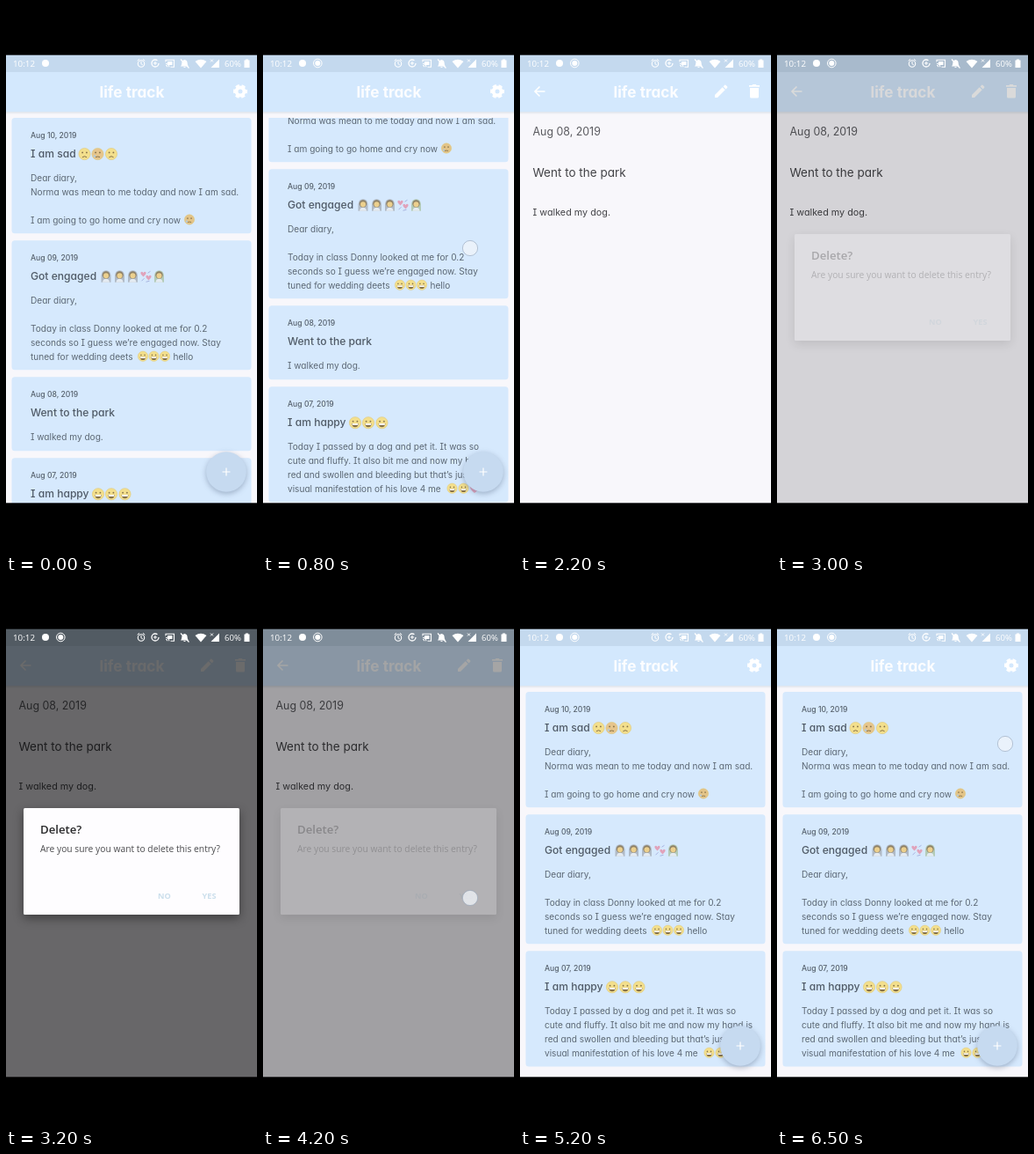
Write an HTML page that moves like this. It is 286 px wide and 620 px high and loops after 6600 ms.

```html
<!DOCTYPE html>
<html lang="en">
<head>
<meta charset="utf-8">
<title>Diary app</title>
<style>
  html, body { margin: 0; width: 100%; height: 100%; overflow: hidden; background: #000; }
  svg { display: block; }
  text { font-family: Inter, sans-serif; font-feature-settings: "cv11", "cv08"; white-space: pre; }
  .system text { font-family: "Open Sans", sans-serif; }
  .fab { filter: drop-shadow(0 2.5px 3px rgba(60, 80, 110, .38)); }
  .panel { filter: drop-shadow(0 4px 6px rgba(0, 0, 0, .4)); }
</style>
</head>
<body>
<svg id="stage" width="286" height="620" viewBox="0 0 286 620"></svg>
<script>
const LOOP = 6600, STEP = 100;
const TOP = 55, HEIGHT = 510, SCROLL = 81;

// ---------- drawing helpers ----------
const text = (x, y, size, str, fill, weight = 400, anchor = 'start') =>
  `<text x="${x}" y="${y}" font-size="${size}" fill="${fill}" font-weight="${weight}" text-anchor="${anchor}">${str}</text>`;
const rect = (x, y, w, h, fill, extra = '') =>
  `<rect x="${x}" y="${y}" width="${w}" height="${h}" fill="${fill}" ${extra}/>`;
const circle = (x, y, r, fill, extra = '') =>
  `<circle cx="${x}" cy="${y}" r="${r}" fill="${fill}" ${extra}/>`;
const line = (d, width = 1, color = '#fff') =>
  `<path d="${d}" fill="none" stroke="${color}" stroke-width="${width}"/>`;
const shape = (d, fill = '#fff') => `<path d="${d}" fill="${fill}"/>`;
const at = (x, y, scale, body) => `<g transform="translate(${x} ${y}) scale(${scale})">${body}</g>`;

// ---------- emoji ----------
const INK = '#857149';
const mouths = {
  frown: line('M-2.6 3.8Q0 1.6 2.6 3.8', 1, INK),
  flat: line('M-2.5 3.6Q0 2.4 2.5 3.6', 1, INK) + circle(-3.5, 2.5, 1.3, '#b4cbd8'),
  grin: shape('M-4 .8H4Q3.4 5 0 5T-4 .8Z', INK) + rect(-3.4, .8, 6.8, 1.8, '#fff')
};
const face = (x, y, r, mood, fill = '#f3df8c') => at(x, y, r / 7,
  circle(0, 0, 6.6, fill, 'stroke="#e0c878" stroke-width=".6"') +
  circle(-2.4, -1.6, .9, INK) + circle(2.4, -1.6, .9, INK) + mouths[mood]);
const bride = (x, y, veil) => at(x, y, 1,
  shape('M-5.5 6.5V-1Q-5 -7 0 -7T5.5 -1V6.5Z', veil) +
  circle(0, -1.8, 4.2, '#8f8268') + circle(0, -1, 3, '#ecd08e') +
  shape('M-4 6.5Q-3.5 2.6 0 2.6T4 6.5Z', '#e4ebf2'));
const heart = (x, y, s) => at(x, y, s, shape('M0 4Q-5 0 -3.6 -2.4Q-1.6 -4 0 -1.4Q1.6 -4 3.6 -2.4Q5 0 0 4Z', '#e0a3bb'));
const confetti = (x, y) => heart(x - 3, y - 3, .8) + heart(x + 3, y + 1, .8) +
  line(`M${x - 5} ${y + 5}l3 -3M${x + 2} ${y - 4}l3 -2M${x} ${y + 6}l4 -1`, 1, '#a7b4e0');
const faces = (xs, y, r, mood) => xs.map(x => face(x, y, r, mood)).join('');

// ---------- diary entries ----------
const BODY = '#5c6874';
const entries = [
  { date: 'Aug 10, 2019', title: 'I am sad',
    lines: ['Dear diary,', 'Norma was mean to me today and now I am sad.', '', 'I am going to go home and cry now'],
    extra: face(89.5, 41, 7, 'frown') + face(104.5, 41, 7, 'flat', '#e6c58c') + face(120, 41, 7, 'frown') +
      face(209, 115.5, 6, 'flat', '#e3c488') },
  { date: 'Aug 09, 2019', title: 'Got engaged',
    lines: ['Dear diary,', '', 'Today in class Donny looked at me for 0.2', 'seconds so I guess we’re engaged now. Stay', 'tuned for wedding deets'],
    extra: [114, 129.5, 144.5].map(x => bride(x, 41, '#b0bac6')).join('') + confetti(159.5, 41) + bride(174.5, 41, '#b3cbb8') +
      faces([156, 168.5, 181], 131.5, 6, 'grin') + text(190.5, 135.5, 10.1, 'hello', BODY) },
  { date: 'Aug 08, 2019', title: 'Went to the park', lines: ['I walked my dog.'], extra: '' },
  { date: 'Aug 07, 2019', title: 'I am happy',
    lines: ['Today I passed by a dog and pet it. It was so', 'cute and fluffy. It also bit me and now my hand is', 'red and swollen and bleeding but that’s just a', 'visual manifestation of his love 4 me'],
    extra: faces([105, 120, 135.5], 41, 7, 'grin') + faces([215.5, 228.5], 115.5, 6, 'grin') + heart(241, 115.5, 1.3) }
];

const pitch = entry => 92 + (entry.lines.length - 1) * 15.75;
const card = entry =>
  rect(6.5, 0, 273, pitch(entry) - 8, '#d6e9fd', 'rx="3.5"') +
  text(28, 23, 8.6, entry.date, '#56616d', 500) +
  text(28, 45, 12.1, entry.title, '#505b67', 500) +
  entry.lines.map((str, i) => text(28, 71.7 + i * 16, 10.1, str, BODY)).join('') + entry.extra;

// ---------- screens ----------
const appBar = icons =>
  rect(0, 120, 286, 1, '#e0e6ee') + rect(0, 121, 286, 1, '#eaecf2') + rect(0, 122, 286, 1, '#f2f2f6') +
  rect(0, TOP, 286, 20, '#c4d9ee') + rect(0, 75, 286, 45, '#d3e8fd') +
  text(143.5, 103.5, 17.2, 'life track', '#fcfdff', 700, 'middle') + icons;

const gear = circle(267, 97, 4.5, 'none', 'stroke="#fff" stroke-width="4"') +
  circle(267, 97, 6.9, 'none', 'stroke="#fff" stroke-width="2.2" stroke-dasharray="4.4 2.825" stroke-dashoffset="2.2"');
const arrow = line('M28.5 97H17M22.5 91.5L17 97L22.5 102.5', 1.6);
const pencil = shape('M222 104v-3l8.7-8.7 3 3L225 104zM231.6 91.4l1.6-1.6q.6-.5 1.2 0l1.8 1.8q.5.6 0 1.2l-1.6 1.6z');
const trash = shape('M262 93h10v10q0 1.5-1.5 1.5h-7q-1.5 0-1.5-1.5zM261 90h3.4l1-1h3.2l1 1h3.4v1.7h-12z');

const statusIcons =
  text(8, 69, 9.8, '10:12', '#fff') + text(249, 69, 9.6, '60%', '#fff') +
  circle(45, 65, 4, '#fff') +
  `<g id="recording">${circle(62.3, 65, 4.8, 'none', 'stroke="#fff"') + circle(62.3, 65, 3, '#fff')}</g>` +
  circle(154, 65.5, 3.7, 'none', 'stroke="#fff" stroke-width="1.1"') +
  line('M154 63v2.8l1.8 1M149.7 62.2l2.3-1.9M158.3 62.2l-2.3-1.9') +
  circle(170, 65, 4, 'none', 'stroke="#fff" stroke-width="1.3" stroke-dasharray="21 4"') + line('M168 65h4M170 63v4') +
  line('M182 63.5v-2.2h9.5v8h-4M182 65.5q3.8 0 3.8 3.8M182 67.5q1.8 0 1.8 1.8', 1.1) + rect(184, 63, 5.5, 4, '#fff') +
  shape('M199 68.5q1.3-1 1.3-3.5 0-3.5 3.2-4 3.2.5 3.2 4 0 2.5 1.3 3.5zM202 69h3q-1.5 2-3 0z') +
  line('M199 60.5l9.5 10', 1.2) +
  shape('M215.5 63q6.5-4.5 13 0l-6.5 7.5z') +
  shape('M233.5 70l9.5-9.5v9.5z') + line('M233 60.5l3 3m0-3l-3 3', .9) +
  shape('M271.5 61.5h1.5v-1h3v1h1.5v8.5h-6z');

const offsets = entries.map((_, i) => 127 + entries.slice(0, i).reduce((sum, e) => sum + pitch(e), 0));

document.getElementById('stage').innerHTML = `
  <defs>
    <clipPath id="feedClip">${rect(0, 127, 286, 438, '#000')}</clipPath>
    <clipPath id="detailClip"><rect id="reveal" width="286" height="${HEIGHT}"/></clipPath>
  </defs>
  <g id="list">
    ${rect(0, TOP, 286, HEIGHT + 20, '#f8f7fb')}${appBar(gear)}
    <g clip-path="url(#feedClip)"><g id="feed">${entries.map((e, i) => `<g id="card${i}" transform="translate(0 ${offsets[i]})">${card(e)}</g>`).join('')}</g></g>
    <g class="fab">${circle(251, 529, 22.8, '#c6daf0')}</g>${line('M246.5 529h9M251 524.5v9', 1.2)}
  </g>
  <rect id="scrim" y="${TOP}" width="286" height="${HEIGHT}"/>
  <g id="detailWindow" clip-path="url(#detailClip)"><g id="detail">
    ${rect(0, TOP, 286, HEIGHT, '#f8f7fb')}${appBar(arrow + pencil + trash)}
    ${text(14.5, 147, 12.4, 'Aug 08, 2019', '#5a5a5f')}
    ${text(14.5, 193.5, 13.5, 'Went to the park', '#434347')}
    ${text(14.5, 237.5, 10.8, 'I walked my dog.', '#434347')}
  </g></g>
  <rect id="dim" y="${TOP}" width="286" height="${HEIGHT}"/>
  <g id="dialog" class="system">
    <g class="panel">${rect(20, 259, 246, 121, '#fefdff', 'rx="1.5"')}</g>
    ${text(39, 287.5, 13.2, 'Delete?', '#29292b', 600)}
    ${text(39, 309, 10.3, 'Are you sure you want to delete this entry?', '#4c4c4f')}
    ${text(180.5, 361.5, 9.2, 'NO', '#cbdfec', 700, 'middle')}
    ${text(231.5, 361.5, 9.2, 'YES', '#cbdfec', 700, 'middle')}
  </g>
  <g class="system">${statusIcons}</g>
  ${circle(0, 0, 8.6, 'rgba(240,244,250,.75)', 'id="touch" stroke="rgba(150,165,185,.6)"')}
  ${rect(0, 0, 286, 55.7, '#000')}${rect(0, 564.3, 286, 56, '#000')}`;

// ---------- motion ----------
const $ = id => document.getElementById(id);
const span = (t, from, to) => Math.min(1, Math.max(0, (t - from) / (to - from)));
const ease = p => { const q = p ** .75; return q * q * (3 - 2 * q); };
const move = (id, y) => $(id).setAttribute('transform', `translate(0 ${y})`);
const show = (id, visible) => { $(id).style.display = visible ? '' : 'none'; };
const fade = (id, alpha) => $(id).setAttribute('opacity', alpha);

// start, end, x, y
const taps = [[1500, 1700, 236, 462], [2900, 3000, 267, 97], [4100, 4300, 236, 361], [6300, LOOP, 260, 186]];

function draw(t) {
  const scroll = SCROLL * (ease(span(t, 100, 700)) - ease(span(t, 900, 1400)));
  const deleted = t > 4200;
  move('feed', -scroll);
  show('card2', !deleted);
  move('card3', offsets[deleted ? 2 : 3]);

  // The detail window is unclipped from the bottom while both windows slide.
  const opening = span(t, 1800, 2200), closing = span(t, 4265, 4690);
  const shift = 1 - ease(opening) + ease(closing);
  const hidden = closing ? 1 - (1 - closing) ** 5.7 : (1 - opening) ** 5.7;
  move('list', -9.7 * (1 - shift));
  move('detail', 21 * shift);
  $('reveal').setAttribute('y', TOP + HEIGHT * hidden);
  show('detailWindow', opening > 0 && closing < 1);
  fade('scrim', .11 * (opening - closing));

  const shown = span(t, 2950, 3150);
  fade('dim', .58 * (shown - span(t, 4120, 4325)));
  fade('dialog', shown - span(t, 4120, 4220));
  show('recording', t >= 100);

  const tap = t >= 100 && t < 1400 ? [0, 0, 236, 356 - scroll] : taps.find(([from, to]) => t >= from && t < to);
  show('touch', tap);
  if (tap) $('touch').setAttribute('transform', `translate(${tap[2]} ${tap[3]})`);
}

const start = performance.now();
function tick() {
  const t = (performance.now() - start + 5) % LOOP;
  draw(Math.floor(t / STEP) * STEP);
  requestAnimationFrame(tick);
}
draw(0);
tick();
</script>
</body>
</html>
```
